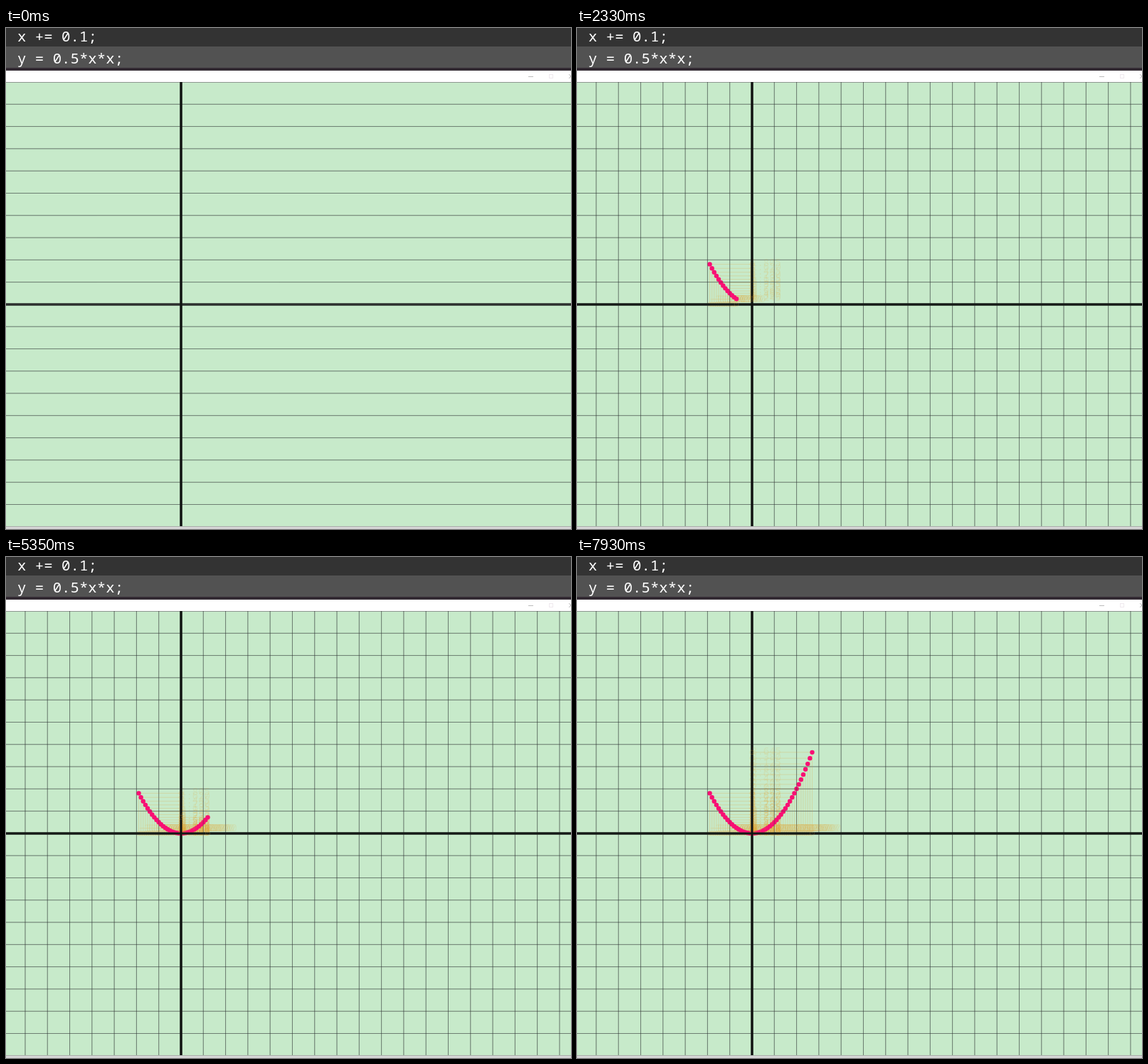
Animation, 794 px wide and 705 px high, one loop 8 s. Source, as an HTML page with a canvas:

```html
<!DOCTYPE html>
<html lang="en">
<head>
<meta charset="utf-8">
<title>Plotting a parabola</title>
<style>
  html, body { margin: 0; width: 100%; height: 100%; overflow: hidden; background: #fff; }
  canvas { display: block; }
</style>
</head>
<body>
<canvas id="stage" width="794" height="705"></canvas>
<script>
const ctx = document.getElementById('stage').getContext('2d');
const W = 794, TOP = 76, BOTTOM = 701, LOOP = 8000;
const OX = 246, OY = 388.9, UNIT = 31.29;
const MONO = '"Noto Sans Mono", "DejaVu Sans Mono", monospace';

// [points plotted, time in ms]; even pace between neighbours
const PACE = [
  [1, 160], [3, 590], [4, 880], [10, 1780], [11, 1970], [13, 2330], [14, 2510],
  [17, 2950], [18, 3060], [20, 3430], [21, 3540], [24, 4030], [25, 4160],
  [31, 5170], [32, 5350], [33, 5480], [38, 6330], [39, 6460], [40, 6640],
  [44, 7440], [45, 7620], [47, 7930]
];

function pointCount(t) {
  if (t < PACE[0][1]) return 0;
  for (let i = 1; i < PACE.length; i++) {
    const [n0, t0] = PACE[i - 1], [n1, t1] = PACE[i];
    if (t < t1) return Math.floor(n0 + (n1 - n0) * (t - t0) / (t1 - t0) + 1e-6);
  }
  return PACE[PACE.length - 1][0];
}

function rect(color, x, y, w, h) {
  ctx.fillStyle = color;
  ctx.fillRect(x, y, w, h);
}

function line(x0, y0, x1, y1) {
  ctx.beginPath();
  ctx.moveTo(x0, y0);
  ctx.lineTo(x1, y1);
  ctx.stroke();
}

function disc(x, y, r) {
  ctx.beginPath();
  ctx.arc(x, y, r, 0, Math.PI * 2);
}

function drawHeader() {
  rect('#333', 0, 0, W, 26);
  rect('#525252', 0, 26, W, 30);
  rect('#322a32', 0, 56, W, 4);
  rect('#fff', 0, 60, W, 16);

  ctx.font = '20.7px ' + MONO;
  ctx.textAlign = 'left';
  ctx.fillStyle = '#fff';
  ctx.fillText('x += 0.1;', 16, 19.3);
  ctx.fillText('y = 0.5*x*x;', 16, 50.3);

  ctx.lineWidth = 1;
  ctx.strokeStyle = '#bbb';
  line(734, 68.5, 741, 68.5);
  line(791, 65, 797, 71);
  line(791, 71, 797, 65);
  ctx.strokeStyle = '#efe9ee';
  ctx.strokeRect(763.5, 65.5, 5, 5);
}

function drawGrid(columns) {
  ctx.strokeStyle = 'rgba(50, 55, 55, 0.37)';
  ctx.lineWidth = 1;
  for (let k = -9; k < 10; k++) {
    const y = OY + k * UNIT;
    if (k) line(0, y, W, y);
  }
  for (let k = -7; columns && k < 18; k++) {
    const x = OX + k * UNIT;
    if (k) line(x, TOP, x, BOTTOM);
  }
  ctx.lineWidth = 3;
  ctx.strokeStyle = columns ? '#151a17' : '#2c302e';
  line(0, OY, W, OY);
  ctx.strokeStyle = '#101311';
  line(OX, TOP, OX, BOTTOM);
}

function drawPoint(i) {
  const x = (i - 19) / 10, y = 0.5 * x * x;
  const px = OX + x * UNIT, py = OY - y * UNIT;

  ctx.lineWidth = 1;
  ctx.strokeStyle = 'rgba(225, 160, 50, 0.24)';
  line(px, py, OX, py);
  line(px, py, px, OY);
  for (const [mx, my] of [[OX, py], [px, OY]]) {
    disc(mx, my, 3);
    ctx.stroke();
  }

  // labels are cut to five characters, sign included
  ctx.font = '14px ' + MONO;
  ctx.fillStyle = 'rgba(235, 170, 55, 0.13)';
  ctx.fillText(x.toFixed(3).slice(0, 5), px - 1, OY - 2.5);
  ctx.fillText(y.toFixed(3), OX - 1, py + 3);

  ctx.fillStyle = '#f80f74';
  disc(px, py, 3.2);
  ctx.fill();
}

function draw(t) {
  const n = pointCount(t);
  drawHeader();
  rect('#c7eaca', 0, TOP, W, BOTTOM - TOP);
  rect('#8d968f', 0, TOP, W, 1);

  // the grid is repainted over all points but the newest
  drawGrid(n > 0);
  for (let i = 0; i < n - 1; i++) drawPoint(i);
  drawGrid(n > 0);
  if (n) drawPoint(n - 1);

  rect('#a9aeaa', 0, BOTTOM, W, 1);
  rect('#d6d6d6', 0, BOTTOM + 1, W, 3);
}

const start = performance.now();
function tick() {
  draw((performance.now() - start) % LOOP);
  requestAnimationFrame(tick);
}
tick();
</script>
</body>
</html>
```
